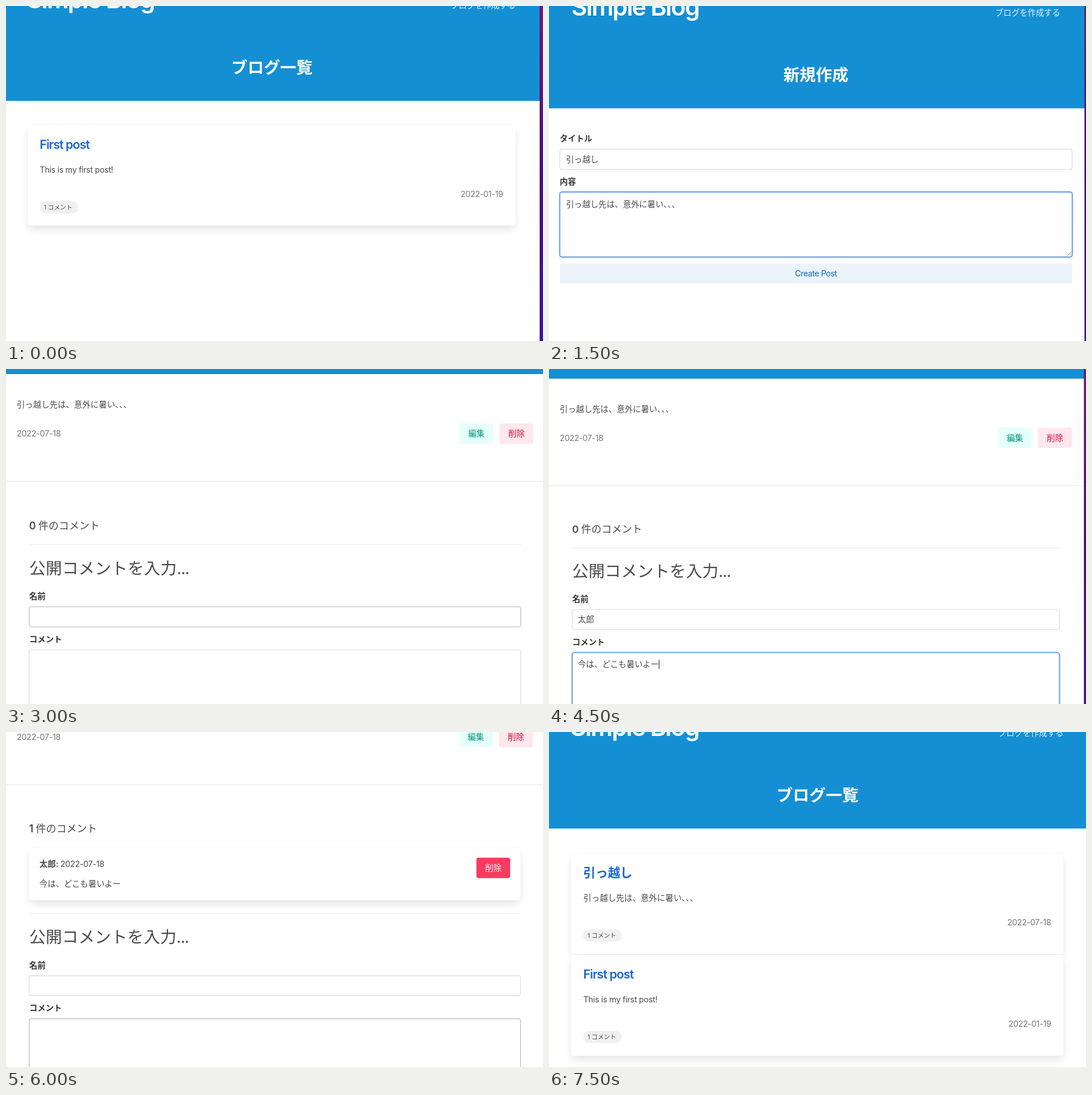
Animation, 948 px wide and 591 px high, one loop 8 s. Source, as an HTML page:

```html
<!DOCTYPE html>
<html lang="ja">
<head>
<meta charset="utf-8">
<title>Simple Blog</title>
<style>
  html, body { margin: 0; width: 100%; height: 100%; overflow: hidden; background: #fff; }
  svg { display: block; width: 948px; height: 591px; }
  text {
    font-family: Inter, "Noto Sans CJK JP", "Noto Sans CJK", sans-serif;
    font-optical-sizing: none;
    white-space: pre;
  }
</style>
</head>
<body>
<svg id="stage" viewBox="0 0 948 591">
  <defs>
    <linearGradient id="desk" x2="0" y2="1">
      <stop offset="0" stop-color="#7d1a78"/>
      <stop offset=".5" stop-color="#4d0d7a"/>
      <stop offset="1" stop-color="#4411a6"/>
    </linearGradient>
    <filter id="blur" x="-10%" y="-30%" width="120%" height="160%">
      <feGaussianBlur stdDeviation="7.2"/>
    </filter>
  </defs>
</svg>
<script>
const NS = 'http://www.w3.org/2000/svg';
const stage = document.getElementById('stage');
const STEP = 1500, LOOP = 8000;
const BLUE = '#158fd3', LINK = '#1b66d2', INK = '#4a4a4a', DARK = '#363636', GREY = '#757575';
const EDGE = '#dadada', HOVER = '#b3b5b5', FOCUS = '#3f7fd9';
const BODY = '引っ越し先は、意外に暑い、、、', REPLY = '今は、どこも暑いよー';

let page;      // group being filled
let em = 14.35; // body text size of that page

function add(tag, attrs, parent = page) {
  const el = document.createElementNS(NS, tag);
  for (const k in attrs) el.setAttribute(k, attrs[k]);
  return parent.appendChild(el);
}

function box(x, y, r, b, attrs) {
  return add('rect', { x, y, width: r - x, height: b - y, ...attrs });
}

// Latin runs are set a little tighter than Japanese ones.
function runs(el, str, weight, track) {
  for (const part of str.split(/([ -~]+)/)) {
    if (!part) continue;
    const latin = /^[ -~]/.test(part);
    const span = add('tspan', { 'font-weight': weight }, el);
    if (latin) span.setAttribute('letter-spacing', track + 'em');
    span.textContent = part;
  }
}

// cy is the middle of the line; lead is an optional bold opening.
function text(x, cy, str, o = {}) {
  const { size = 1, fill = INK, weight = 400, anchor = 'start', track = -.022, lead = '' } = o;
  const px = size * em;
  const el = add('text', { x, y: cy + px * .37, 'font-size': px, fill, 'text-anchor': anchor });
  if (lead) runs(el, lead, 600, track);
  runs(el, str, weight, track);
}

const label = (x, cy, str) => text(x, cy, str, { weight: 600, fill: DARK });

function rule(x, y, r, stroke = '#ebecec') {
  add('line', { x1: x, x2: r, y1: y, y2: y, stroke, 'stroke-width': 1.3 });
}

function field(x, y, r, b, stroke = EDGE) {
  if (stroke === FOCUS)
    box(x, y, r, b, { rx: 4, fill: 'none', stroke: '#c9dcf5', 'stroke-width': 4.5 });
  box(x, y, r, b, { rx: 3.6, fill: '#fff', stroke, 'stroke-width': 1.2 });
}

function card(x, y, r, b) {
  box(x + 2, y + 9, r - 2, b + 5.4, { rx: 5, fill: '#0a0a0a', opacity: .12, filter: 'url(#blur)' });
  box(x - .5, y - .5, r + .5, b + .5, { rx: 5, fill: '#0a0a0a', opacity: .035 });
  box(x, y, r, b, { rx: 4.5, fill: '#fff' });
}

function button(x, cy, str, fill, ink) {
  box(x, cy - 18, x + 59.5, cy + 18, { rx: 3.6, fill });
  text(x + 29.8, cy, str, { fill: ink, anchor: 'middle' });
}

function desktop(x) {
  box(x, 0, 948, 591, { fill: 'url(#desk)' });
  box(x, 0, x + 1, 591, { fill: '#1d0a3a', opacity: .6 });
}

function hero(bottom, x, right, mid, title) {
  box(0, 0, 948, bottom, { fill: BLUE });
  text(x - 1.5, bottom - 179.5, 'Simple Blog', { size: 3, weight: 600, fill: '#fff', track: -.042 });
  text(right, bottom - 169, 'ブログを作成する', { fill: '#e3f1fa', anchor: 'end' });
  text(mid, bottom - 59.3, title, { size: 2, weight: 600, fill: '#fff', anchor: 'middle' });
}

function post(x, y, r, b, title, body, date) {
  card(x, y, r, b);
  const tx = x + 21.5;
  text(tx, y + 34.3, title, { size: 1.5, weight: 600, fill: LINK, track: -.045 });
  text(tx, y + 79, body);
  text(r - 22, y + 122, date, { fill: GREY, anchor: 'end' });
  box(tx, y + 134.3, tx + 67.8, y + 156, { rx: 10.8, fill: '#f0f0f0' });
  text(tx + 7.6, y + 145, '1 コメント', { size: .75 });
}

const firstPost = (x, y, r, b) => post(x, y, r, b, 'First post', 'This is my first post!', '2022-01-19');

function meta(cy, right) {
  text(19, cy, '2022-07-18', { fill: GREY });
  button(right - 130.3, cy, '編集', '#e6fffa', '#00947e');
  button(right - 59.6, cy, '削除', '#fee7ed', '#cc1138');
  rule(0, cy + 84, 948);
}

function count(cy, n) {
  text(40.7, cy, ' 件のコメント', { size: 1.25, lead: n });
}

function form(cy, right, nameEdge, noteEdge) {
  const x = 41;
  text(x, cy, '公開コメントを入力...', { size: 2, track: -.04 });
  label(x, cy + 50, '名前');
  field(x, cy + 68.5, right, cy + 104, nameEdge);
  label(x, cy + 125.5, 'コメント');
  field(x, cy + 144.5, right, cy + 260, noteEdge);
}

const pages = [
  [14.35, () => {
    hero(167.5, 38, 899.5, 469.5, 'ブログ一覧');
    firstPost(38, 210, 899.5, 387.5);
    desktop(942.3);
  }],
  [14.35, () => {
    hero(180.5, 41, 902.5, 471, '新規作成');
    label(19, 234, 'タイトル');
    field(19.2, 252.7, 923.5, 288.3);
    text(30, 270.5, '引っ越し');
    label(19, 310, '内容');
    field(19.2, 328.3, 923.5, 442.7, FOCUS);
    text(30, 349.5, BODY);
    add('path', { d: 'M915 441l7-7M919 441l3-3', stroke: '#777', 'stroke-width': .9 });
    box(19, 454, 923.5, 489.5, { rx: 3.6, fill: '#ebf4fb' });
    text(471.3, 472, 'Create Post', { fill: '#0c6aa3', anchor: 'middle', track: -.032 });
    desktop(945.5);
  }],
  [14.47, () => {
    box(0, 0, 948, 9, { fill: BLUE });
    text(19, 63, BODY);
    meta(114, 931);
    count(276, '0');
    rule(41, 309.5, 909);
    form(351, 908.7, HOVER, EDGE);
  }],
  [14.35, () => {
    box(0, 0, 948, 17, { fill: BLUE });
    text(19, 71, BODY);
    meta(121.3, 923);
    count(282, '0');
    rule(40.5, 315.5, 901.5);
    form(356, 901, EDGE, FOCUS);
    text(51, 442, '太郎');
    text(51, 521, REPLY);
    box(193.8, 513, 194.9, 529, { fill: '#222' });
    desktop(944.5);
  }],
  [14.45, () => {
    meta(9, 930);
    count(170.3, '1');
    card(40.5, 203.5, 908.5, 297);
    text(59, 232.5, ' 2022-07-18', { lead: '太郎:' });
    text(59, 268, REPLY);
    button(830.5, 239.7, '削除', '#f93a60', '#fff0f3');
    rule(40.5, 320, 908.5);
    form(361.3, 908.3, EDGE, HOVER);
  }],
  [14.47, () => {
    hero(170.3, 39, 908.5, 474, 'ブログ一覧');
    post(39, 213.7, 908.5, 392, '引っ越し', BODY, '2022-07-18');
    firstPost(39, 392.7, 908.5, 571.5);
  }]
].map(([size, draw]) => {
  page = add('g', {}, stage);
  em = size;
  box(0, 0, 948, 591, { fill: '#fff' });
  draw();
  return page;
});

function show(ms) {
  const now = Math.floor((ms % LOOP) / STEP);
  pages.forEach((p, i) => p.setAttribute('display', i === now ? 'inline' : 'none'));
}

const start = performance.now();
function tick() {
  show(performance.now() - start);
  requestAnimationFrame(tick);
}
tick();
</script>
</body>
</html>
```
